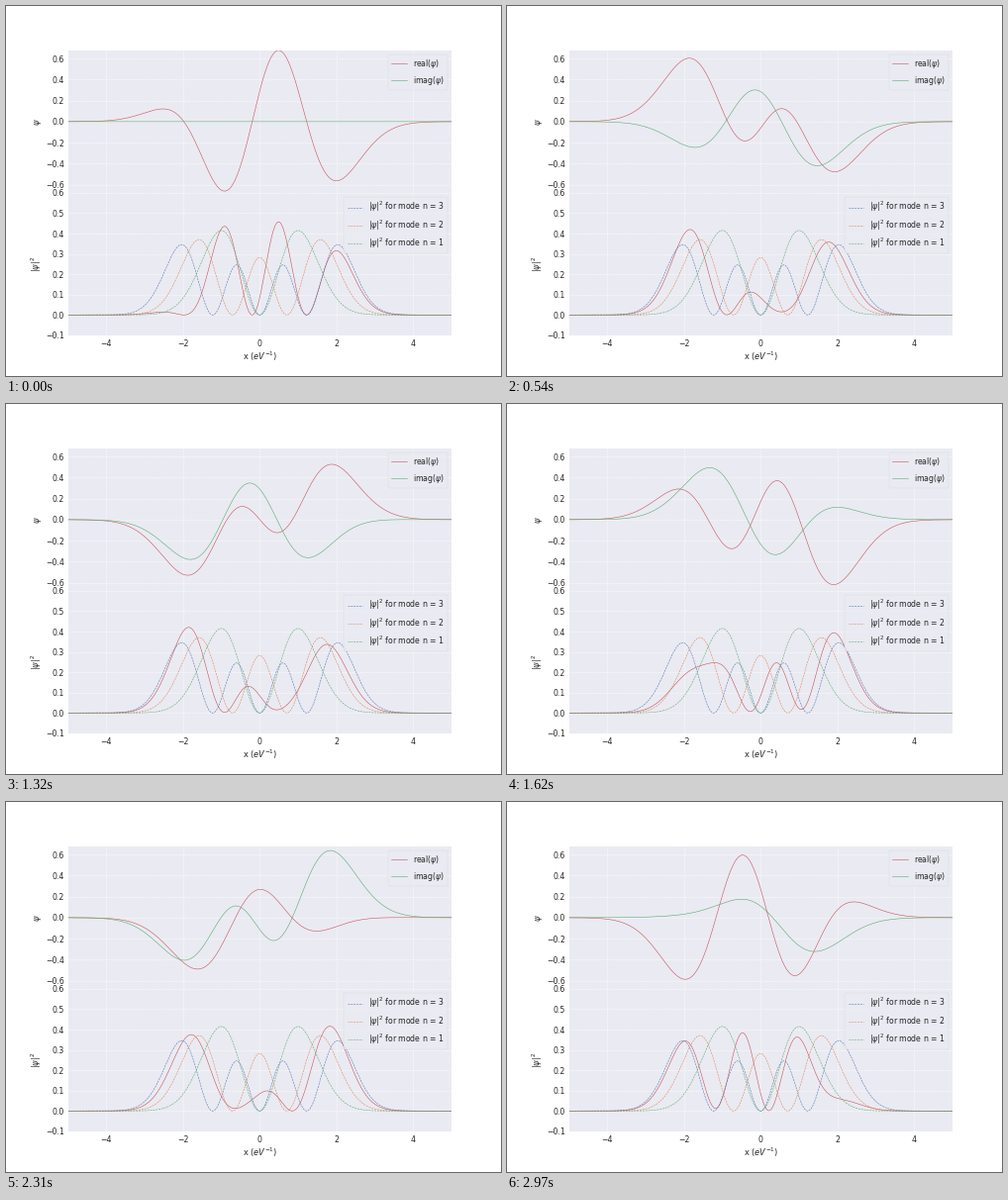
Write a matplotlib script that moves like this. It is 500 px wide and 374 px high and loops after 3000 ms.

```python
import math

import matplotlib.pyplot as plt
import numpy as np
from matplotlib.animation import FuncAnimation

W, H, DPI = 500, 374, 64
FRAMES, INTERVAL = 100, 30
DT = 0.1                      # phase step per frame, omega = 1
PX = 72 / DPI                 # one pixel in points
FONT = 7.75                   # text size in pixels
BLUE, ORANGE, GREEN, RED = "#4C72B0", "#DD8452", "#55A868", "#C44E52"

plt.rcParams.update({
    "font.family": "DejaVu Sans",
    "font.size": FONT * PX,
    "mathtext.fontset": "dejavusans",
    "text.color": "0.15",
    "axes.labelcolor": "0.15",
    "axes.labelsize": 8.2 * PX,
    "axes.labelpad": 1.9 * PX,
    "axes.facecolor": "#EAEAF2",
    "axes.linewidth": 0,
    "axes.axisbelow": True,
    "axes.grid": True,
    "grid.color": "white",
    "grid.linestyle": "--",
    "grid.linewidth": 0.5 * PX,
    "xtick.color": "0.15",
    "ytick.color": "0.15",
    "xtick.labelsize": FONT * PX,
    "ytick.labelsize": FONT * PX,
    "xtick.major.size": 0,
    "ytick.major.size": 0,
    "xtick.major.pad": 3.7 * PX,
    "ytick.major.pad": 3.5 * PX,
    "lines.linewidth": 0.54 * PX,
    "legend.fontsize": FONT * PX,
    "patch.linewidth": 0.3 * PX,
})


def mode(n, x):
    """Harmonic oscillator eigenfunction."""
    hermite = np.polynomial.hermite.hermval(x, [0] * n + [1])
    norm = math.sqrt(2**n * math.factorial(n) * math.sqrt(math.pi))
    return hermite * np.exp(-x**2 / 2) / norm


x = np.linspace(-5, 5, 600)
weights = {1: math.sqrt(0.2), 2: -math.sqrt(0.3), 3: -math.sqrt(0.5)}
modes = {n: mode(n, x) for n in weights}


def psi(t):
    return sum(c * modes[n] * np.exp(-1j * (n + 0.5) * t)
               for n, c in weights.items())


fig, (top, low) = plt.subplots(2, 1, sharex=True, dpi=DPI,
                               figsize=(W / DPI, H / DPI))
fig.subplots_adjust(left=0.125, right=0.9, bottom=0.11, top=0.88, hspace=0)

peak = np.abs(psi(0)).max()
top.set(xlim=(-5, 5), ylim=(-peak, peak), yticks=np.arange(-3, 4) / 5,
        ylabel=r"$\psi$")
low.set(ylim=(-0.1, 0.6), xticks=range(-4, 5, 2),
        yticks=np.arange(-1, 7) / 10,
        xlabel=r"x ($eV^{-1}$)", ylabel=r"$|\psi|^2$")
top.tick_params(labelbottom=False)

real, = top.plot([], [], color=RED, snap=False, label=r"real($\psi$)")
imag, = top.plot([], [], color=GREEN, snap=False, label=r"imag($\psi$)")
density, = low.plot([], [], color=RED)
for n, color in ((3, BLUE), (2, ORANGE), (1, GREEN)):
    low.plot(x, modes[n]**2, "--", color=color,
             label=rf"$|\psi|^2$ for mode n = {n}")

for ax in (top, low):
    ax.legend(loc="upper right")


def update(i):
    wave = psi(i * DT)
    real.set_data(x, wave.real)
    imag.set_data(x, wave.imag)
    density.set_data(x, np.abs(wave)**2)
    return real, imag, density


anim = FuncAnimation(fig, update, frames=FRAMES, interval=INTERVAL,
                     init_func=lambda: update(0), repeat=True,
                     repeat_delay=0)
plt.show()
```
